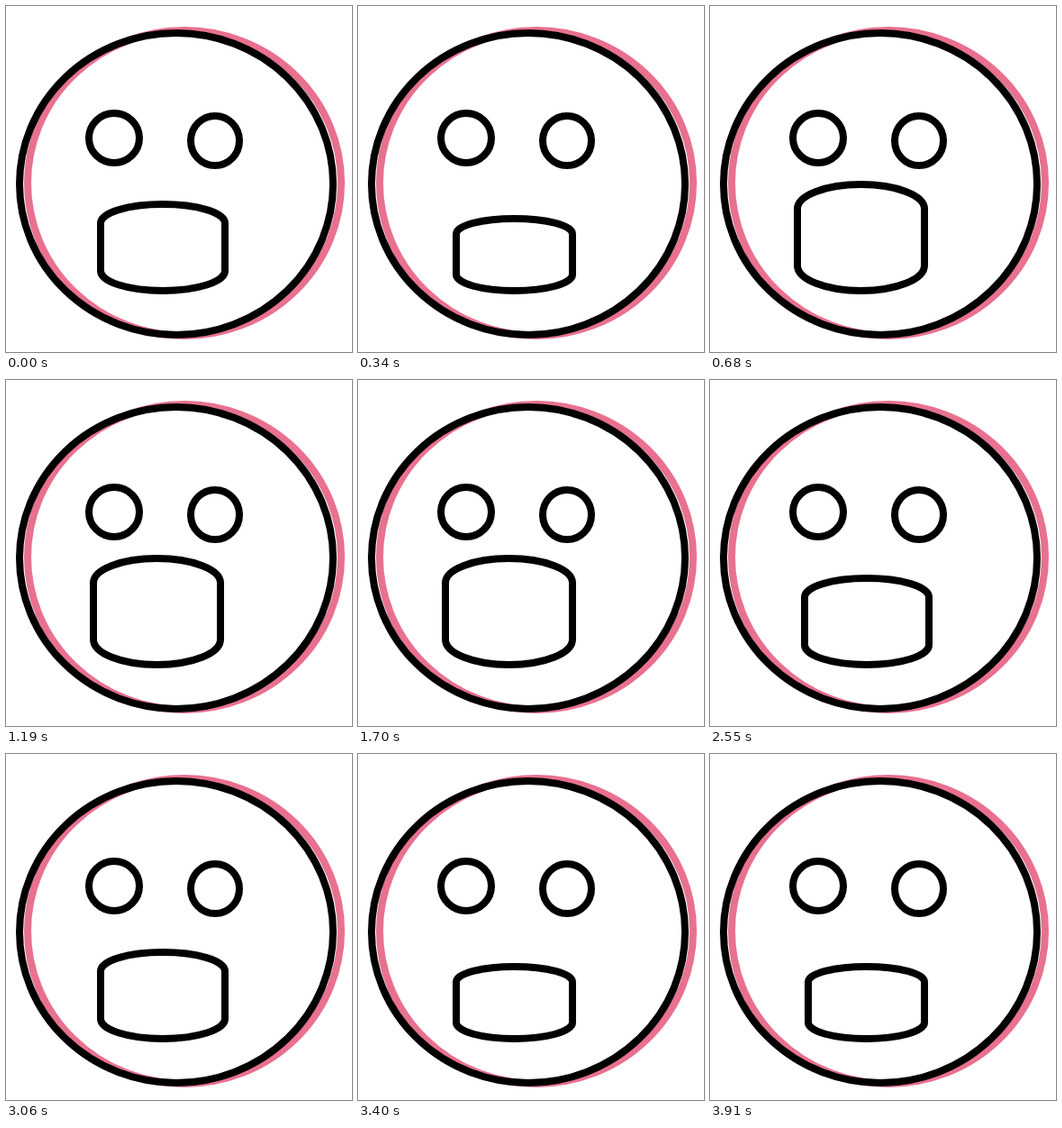
Animation of 384 by 384 pixels, one loop 4080 ms. Source, as an HTML page:

```html
<!DOCTYPE html>
<html lang="en">
<head>
<meta charset="utf-8">
<title>Shouting face</title>
<style>
  html, body { margin: 0; width: 100%; height: 100%; overflow: hidden; background: #fff; }
  svg { display: block; width: 100vw; height: 100vh; fill: none; stroke: #000; stroke-width: 8; }
  .shadow { stroke: #e8718f; }
  .mouth { opacity: 0; animation: show 510ms step-end infinite; }
  .wide { animation-delay: 0ms; }
  .tall { animation-delay: -340ms; }
  .small { animation-delay: -170ms; }
  /* each mouth holds for one third of the cycle */
  @keyframes show {
    0% { opacity: 1; }
    33.3333% { opacity: 0; }
    100% { opacity: 0; }
  }
</style>
</head>
<body>
<svg viewBox="0 0 384 384">
  <ellipse class="shadow" cx="198" cy="196.5" rx="174" ry="169.5"/>
  <ellipse cx="189" cy="197.5" rx="174" ry="167.5"/>
  <ellipse cx="120" cy="146.5" rx="28" ry="27.5"/>
  <ellipse cx="232" cy="149.5" rx="27" ry="27.5"/>
  <path class="mouth wide" d="M105 241A69 21 0 0 1 243 241V294A69 22 0 0 1 105 294Z"/>
  <path class="mouth tall" d="M97 225A70.5 27 0 0 1 238 225V288A70.5 28 0 0 1 97 288Z"/>
  <path class="mouth small" d="M109 253A64.5 17 0 0 1 238 253V298A64.5 18 0 0 1 109 298Z"/>
</svg>
</body>
</html>
```
